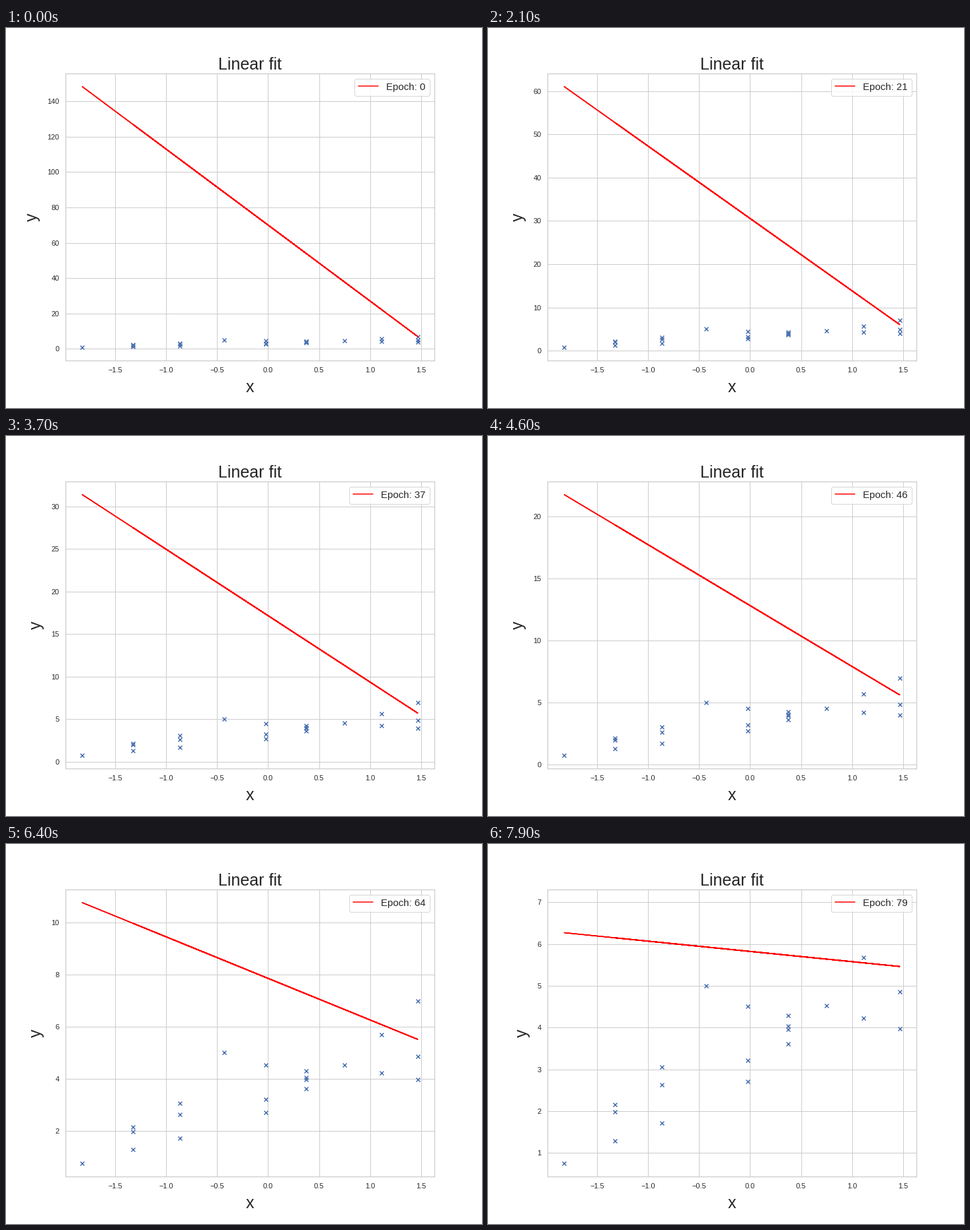
Animation of 720 by 576 pixels, one loop 8 s. Source, as a matplotlib script:

```python
import numpy as np
import matplotlib.pyplot as plt
from matplotlib.animation import FuncAnimation

EPOCHS = 80
INTERVAL = 100
GREY, INK, BLUE = "0.8", "0.15", "#4c72b0"

plt.rcParams.update({
    "font.family": "sans-serif",
    "font.sans-serif": ["Liberation Sans", "DejaVu Sans"],
    "text.color": INK,
    "axes.labelcolor": INK,
    "axes.edgecolor": GREY,
    "axes.linewidth": 1.25,
    "axes.axisbelow": True,
    "grid.color": GREY,
    "grid.linewidth": 1,
    "lines.linewidth": 1.5,
    "lines.solid_capstyle": "round",
    "patch.linewidth": 1,
    "legend.edgecolor": GREY,
    "legend.framealpha": 0.8,
})

# Standardised feature levels with the responses seen at each one
SAMPLES = {
    -1.8217: [0.748],
    -1.3231: [2.152, 1.980, 1.290],
    -0.8636: [3.060, 2.628, 1.722],
    -0.4300: [5.004],
    -0.0198: [4.512, 3.208, 2.705],
    0.3743: [4.287, 4.036, 3.960, 3.614],
    0.7501: [4.529],
    1.1131: [5.679, 4.227],
    1.4659: [6.990, 4.858, 3.977],
}
x, y = np.array([(k, v) for k, vs in SAMPLES.items() for v in vs]).T
order = np.random.default_rng(3).permutation(len(x))
x, y = x[order], y[order]

# Gradient descent closes a fixed share of the gap to the best fit per epoch
DECAY = 0.95802
START = np.array([-43.0, 70.0])
BEST = np.polyfit(x, y, 1)


def predict(epoch):
    slope, bias = BEST + (START - BEST) * DECAY ** epoch
    return slope * x + bias


def padded(*values):
    lo, hi = np.min(values), np.max(values)
    pad = 0.05 * (hi - lo)
    return lo - pad, hi + pad


fig, ax = plt.subplots(figsize=(10, 8), dpi=72, facecolor="white")
fig.subplots_adjust(left=0.125, right=0.9, bottom=0.125, top=0.88)
ax.grid(True)
ax.tick_params(length=0, pad=9.5, labelsize=11, labelcolor=INK)
ax.set_title("Linear fit", fontsize=25, pad=6)
ax.set_xlabel("x", fontsize=25, labelpad=10)
ax.set_ylabel("y", fontsize=25, labelpad=10)
ax.set_xlim(padded(x))

ax.scatter(x, y, marker="x", s=36, linewidths=1.5, color=BLUE)
line, = ax.plot(x, predict(0), color="red", label="Epoch: 0")
legend = ax.legend(loc="upper right", fontsize=15)
caption = legend.get_texts()[0]


def update(epoch):
    fit = predict(epoch)
    line.set_ydata(fit)
    ax.set_ylim(padded(y, fit))
    caption.set_text(f"Epoch: {epoch}")
    return line, caption


anim = FuncAnimation(fig, update, frames=EPOCHS, interval=INTERVAL,
                     init_func=lambda: update(0), repeat=True,
                     repeat_delay=0, blit=False)
plt.show()
```
